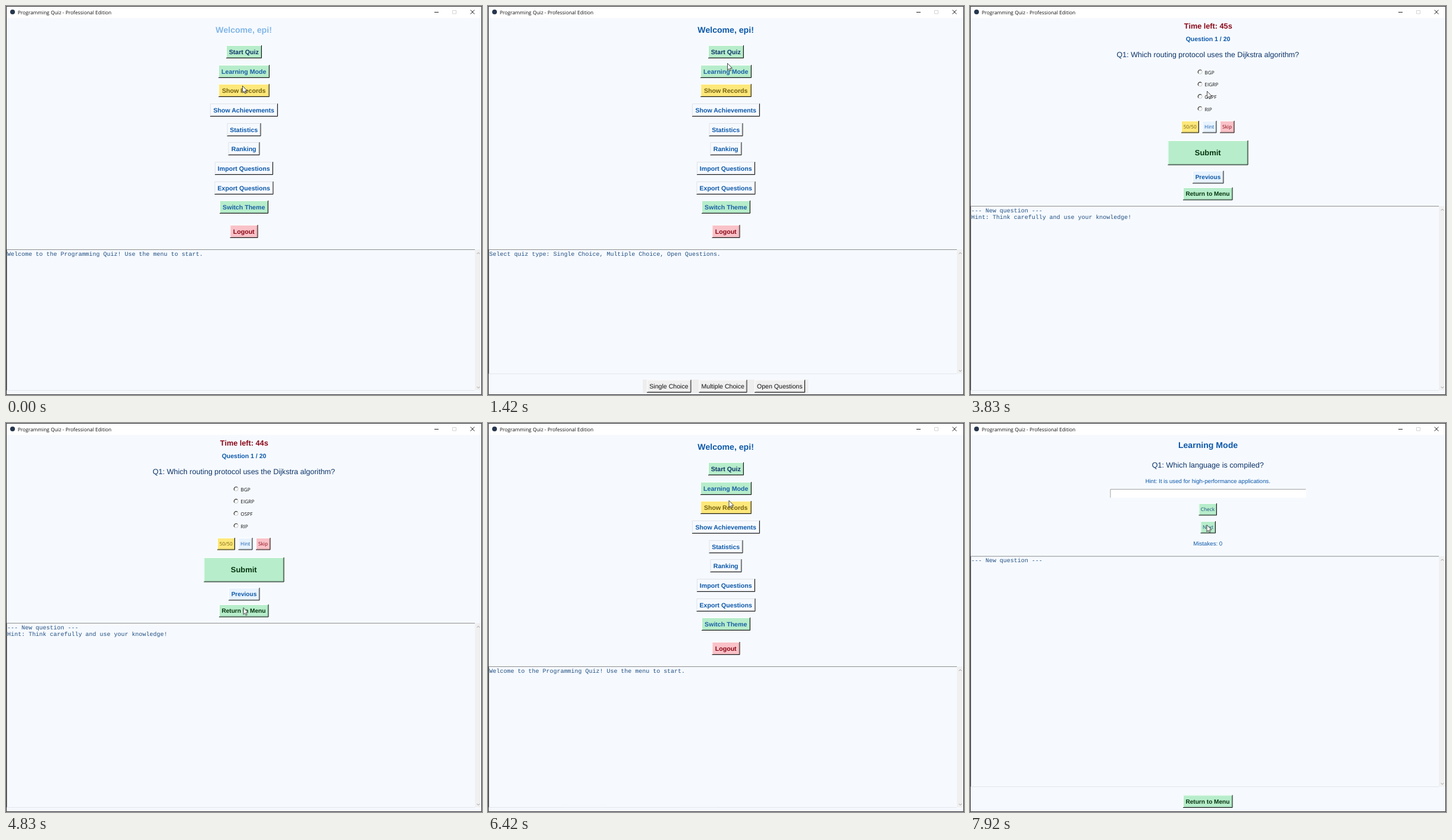
An HTML page for the animation above (8 s loop, 800 by 654 pixels).

```html
<!DOCTYPE html>
<html lang="en">
<head>
<meta charset="utf-8">
<title>Programming Quiz</title>
<style>
html, body { margin: 0; width: 100%; height: 100%; overflow: hidden; background: #f6faff; }
svg { display: block; width: 100%; height: 100%; text-rendering: geometricPrecision; }
text { font-family: "Liberation Sans", Arial, sans-serif; white-space: pre; }
.bold { font-weight: bold; }
.ui { font-family: "Open Sans", "Noto Sans", sans-serif; }
.mono { font-family: "Liberation Mono", "Courier New", monospace; }

/* One loop is 8000 ms, so 1% is 80 ms. */
.scene { animation: 8s step-end infinite; }
#menu { animation-name: menu; }
#log { animation-name: log; }
#choices { animation-name: choices; }
#pressed { animation-name: pressed; }
#quiz { animation-name: quiz; }
#blank { animation-name: blank; }
#learn { animation-name: learn; }
#t45 { animation-name: t45; }
#t44 { animation-name: t44; }
#t43 { animation-name: t43; }
#welcome { animation: welcome 8s linear infinite; }
#cursor { animation: cursor 8s linear infinite; }

@keyframes menu { 0%, 71.875% { opacity: 1 } 36.5%, 86.5%, 100% { opacity: 0 } }
@keyframes log { 0%, 50%, 100% { opacity: 1 } 9.375% { opacity: 0 } }
@keyframes choices { 0%, 50%, 100% { opacity: 0 } 9.375% { opacity: 1 } }
@keyframes pressed { 0%, 36.5%, 100% { opacity: 0 } 34.5% { opacity: 1 } }
@keyframes quiz { 0%, 68.75%, 100% { opacity: 0 } 36.5% { opacity: 1 } }
@keyframes blank { 0%, 71.875%, 100% { opacity: 0 } 68.75% { opacity: 1 } }
@keyframes learn { 0% { opacity: 0 } 86.5%, 100% { opacity: 1 } }
@keyframes t45 { 0% { opacity: 1 } 49%, 100% { opacity: 0 } }
@keyframes t44 { 0%, 61.5%, 100% { opacity: 0 } 49% { opacity: 1 } }
@keyframes t43 { 0% { opacity: 0 } 61.5%, 100% { opacity: 1 } }
@keyframes welcome {
  0% { fill: #83b6e7 }
  4%, 71.8% { fill: #0d58a8 }
  71.875% { fill: #f6faff }
  79%, 100% { fill: #0d58a8 }
}
@keyframes cursor {
  0%, 1% { transform: translate(397px, 134px) }
  7%, 15% { transform: translate(404px, 78px) }
  17.75%, 20.9% { transform: translate(402px, 96px) }
  25% { transform: translate(414px, 260px) }
  31.25% { transform: translate(354px, 597px) }
  34.5%, 36.6% { transform: translate(303.5px, 646px) }
  41.6% { transform: translate(385px, 330px) }
  47%, 50% { transform: translate(398px, 143px) }
  61%, 71.9% { transform: translate(398.5px, 320px) }
  79%, 81% { transform: translate(404.5px, 130px) }
  85%, 88% { transform: translate(400px, 107px) }
  93.75% { transform: translate(467px, 70px) }
  98.5%, 100% { transform: translate(397.5px, 171px) }
}
</style>
</head>
<body>
<svg id="stage" viewBox="0 0 800 654"></svg>
<script>
const BG = '#f6faff', BLUE = '#0d58a8', NAVY = '#0d3468', RED = '#8a0716';
const GREEN = '#b7edcb', YELLOW = '#fde87b', PINK = '#f9c2c8', ICE = '#e8f3fe', GREY = '#eeeeee';
const PINE = '#06340f';

const rect = (x, y, w, h, fill) => `<rect x="${x}" y="${y}" width="${w}" height="${h}" fill="${fill}"/>`;
const path = (d, stroke, width = 1) => `<path d="${d}" fill="none" stroke="${stroke}" stroke-width="${width}"/>`;
const text = (str, x, y, size, fill, cls = '', anchor = 'middle', attrs = '') =>
  `<text x="${x}" y="${y}" font-size="${size}" fill="${fill}" class="${cls}" text-anchor="${anchor}" ${attrs}>${str}</text>`;
const scene = (id, ...parts) => `<g id="${id}" class="scene">${parts.join('')}</g>`;

// Raised button; the label is centred in the box.
function button(label, x, y, w, h, fill, ink, size, cls = 'bold') {
  const r = x + w, b = y + h;
  const light = fill === BG ? '#dfe3e8' : '#ffffff';
  return rect(x, y, w, h, fill)
    + path(`M${x + .5} ${b - 1}V${y + .5}H${r - 1}`, light)
    + path(`M${x + 1.5} ${b - 1.5}H${r - 1.5}V${y + 1.5}`, 'rgba(0,0,0,.28)', .8)
    + path(`M${x} ${b - .5}H${r - .5}V${y}`, '#1c1c1c')
    + text(label, x + w / 2 - .3, y + h / 2 + size * .35, size, ink, cls);
}

function sunken(label, x, y, w, h) {
  const r = x + w, b = y + h;
  return rect(x, y, w, h, '#f0f0f0')
    + path(`M${x + .5} ${b}V${y + .5}H${r}`, '#4a4a4a')
    + path(`M${x} ${b - .5}H${r - .5}V${y}`, '#ffffff')
    + text(label, x + w / 2 + .6, y + h / 2 + 4.4, 10.6, '#111');
}

// Read-only text area with its scrollbar.
function pane(top, bottom, ...lines) {
  return rect(1, top, 798, bottom - top, BG)
    + rect(788, top, 11, bottom - top, '#f0f0f0')
    + path(`M1.4 ${bottom}V${top + .3}H788`, '#8c8c8c')
    + path(`M1 ${bottom}H788`, '#e2e5e9')
    + path(`M791.5 ${top + 7.5}l2.3 -2.3l2.3 2.3M791.5 ${bottom - 6.2}l2.3 2.3l2.3 -2.3`, '#9a9a9a')
    + lines.map((s, i) => text(s, 2, top + 10.4 + i * 11.3, 9.97, '#234f80', 'mono', 'start')).join('');
}

const items = [
  ['Start Quiz', 60, GREEN, NAVY], ['Learning Mode', 86, GREEN, '#1a60a6'],
  ['Show Records', 85.5, YELLOW, '#76620f'], ['Show Achievements', 114, BG, BLUE],
  ['Statistics', 57, BG, BLUE], ['Ranking', 53, BG, BLUE],
  ['Import Questions', 98, BG, BLUE], ['Export Questions', 99, BG, BLUE],
  ['Switch Theme', 82, GREEN, '#1a60a6'], ['Logout', 47, PINK, RED]
];
const itemY = i => i === 9 ? 368 : Math.round(66 + i * 32.65);

const menuButtons = items.map(([label, w, fill, ink], i) =>
  button(label, 400 - w / 2, itemY(i), w, 22, fill, ink, 10.6)).join('');
const placeholders = items.slice(0, 8).map(([, w], i) =>
  rect(400 - w / 2, itemY(i), w, 22, GREY)).join('');

const choices = [['Single Choice', 267, 74.5], ['Multiple Choice', 354.5, 81], ['Open Questions', 448, 85]]
  .map(([label, x, w]) => button(label, x, 628.5, w, 21.5, '#f0f0f0', '#111', 10.6, '')).join('');

const radios = ['BGP', 'EIGRP', 'OSPF', 'RIP'].map((label, i) => {
  const y = 110.7 + i * 20.6;
  return `<circle cx="386.5" cy="${y}" r="3.6" fill="#fff" stroke="#b5b5b5" stroke-width=".8"/>`
    + path(`M384 ${y + 2.5}a3.6 3.6 0 0 1 5 -5`, '#3c3c3c', 1.1)
    + text(label, 394.3, y + 4, 8.3, '#111', 'ui', 'start');
}).join('');

const timers = [45, 44, 43].map(s =>
  text(`Time left: ${s}s`, 400.3, 38, 12.7, RED, 'bold scene', 'middle', `id="t${s}"`)).join('');

const small = (label, x, y, w, h, fill, ink) => button(label, x, y, w, h, fill, ink, 8.3, 'ui');
const returnButton = y => button('Return to Menu', 358, y, 83.5, 21.5, GREEN, PINE, 10.1);

document.getElementById('stage').innerHTML = [
  rect(0, 0, 800, 654, BG),
  rect(0, 0, 800, 20, '#ffffff'),
  '<circle cx="11" cy="10" r="4" fill="#26364d"/>',
  text('Programming Quiz - Professional Edition', 19.7, 13.8, 8.4, '#111', 'ui', 'start'),
  path('M720 10.5H727', '#222'),
  path('M750.5 7.5H756.5V13H750.5Z', '#cfcfcf', .9),
  path('M780.5 6.7L787.5 13.5M787.5 6.7L780.5 13.5', '#222'),

  scene('menu',
    text('Welcome, epi!', 399.6, 45.3, 14.1, BLUE, 'bold', 'middle', 'id="welcome"'),
    menuButtons,
    scene('log', pane(409.3, 646.3, 'Welcome to the Programming Quiz! Use the menu to start.')),
    scene('choices',
      pane(409.3, 618.3, 'Select quiz type: Single Choice, Multiple Choice, Open Questions.'),
      rect(260, 628, 278.5, 22.5, GREY), choices,
      scene('pressed', sunken('Single Choice', 267, 628.5, 74.5, 21.5)))),

  scene('quiz',
    timers,
    text('Question 1 / 20', 400, 59.2, 10.5, BLUE, 'bold'),
    text('Q1: Which routing protocol uses the Dijkstra algorithm?', 399.8, 86, 12.54, NAVY),
    radios,
    small('50/50', 355, 193, 30, 20.5, YELLOW, '#76620f'),
    small('Hint', 390.5, 193, 24, 20.5, ICE, BLUE),
    small('Skip', 420, 193, 24.5, 20.5, PINK, RED),
    button('Submit', 332.5, 226, 135, 41.5, GREEN, PINE, 12.9),
    button('Previous', 374, 277, 52.5, 21.5, ICE, BLUE, 10.1),
    returnButton(305),
    pane(336.3, 646.3, '--- New question ---', 'Hint: Think carefully and use your knowledge!')),

  scene('blank', placeholders),

  scene('learn',
    text('Learning Mode', 400, 42, 14.1, BLUE, 'bold'),
    text('Q1: Which language is compiled?', 399.8, 74.8, 12.64, NAVY),
    text('Hint: It is used for high-performance applications.', 399.8, 100.6, 9.69, BLUE),
    rect(235.5, 111, 329, 14.5, '#ffffff'),
    path('M236 125.5V111.4H564.5', '#a0a0a0'),
    small('Check', 384.5, 135, 30.5, 20.5, GREEN, '#174a7c'),
    small('Next', 387.5, 165, 25.5, 20.5, GREEN, '#174a7c'),
    text('Mistakes: 0', 399.8, 206.4, 9.69, BLUE),
    pane(223.8, 611.5, '--- New question ---'),
    returnButton(625.5)),

  path('M.5 .5H799.5V653.5H.5Z', '#24272b'),
  '<path id="cursor" d="M.5 .3V11.8L3.1 9.4L4.8 13.2L6.6 12.4L4.9 8.7H8.4Z" fill="#fff" stroke="#1a1a1a" stroke-width=".8"/>'
].join('');
</script>
</body>
</html>
```
